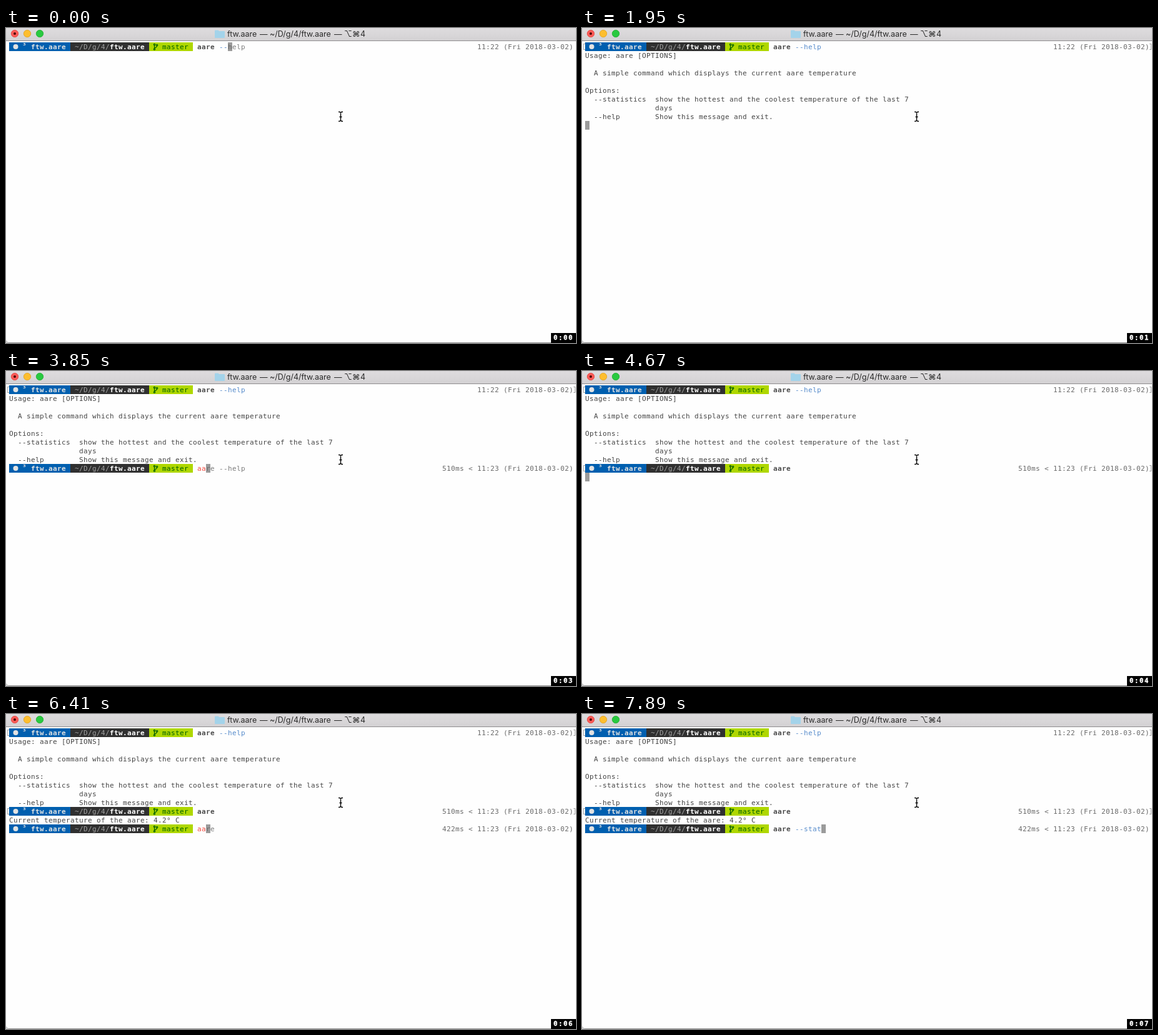
Recreate the animation shown at these times as an HTML page. Size 912 px wide and 505 px high, loop 8000 ms.

```html
<!DOCTYPE html>
<html lang="en">
<head>
<meta charset="utf-8">
<title>Terminal session</title>
<style>
  html, body { margin: 0; width: 100%; height: 100%; overflow: hidden; }
  #stage { position: relative; width: 912px; height: 505px; overflow: hidden; background: #d9d9d9; }
  #window {
    position: absolute; inset: 0; box-sizing: border-box; background: #fefefe;
    border-bottom: 1px solid #8c8c8c; border-bottom-left-radius: 5px;
  }
  svg { position: absolute; left: 0; top: 0; }
  .title { font: 12.5px Inter, "DejaVu Sans", sans-serif; fill: #2a2a2a; }
  #term {
    position: absolute; left: 0; top: 0; color: #444;
    font: 11px/14px "DejaVu Sans Mono", monospace;
    letter-spacing: calc(7px - 1ch);
  }
  #term div { position: absolute; box-sizing: border-box; height: 14px; padding-top: 1px; white-space: pre; }
  #term .blue { background: #005faf; color: #e2e2e2; font-weight: bold; }
  #term .blue span { position: relative; top: -2px; }
  #term .dark { background: #303030; color: #a0a0a0; }
  #term .dark b { color: #fff; }
  #term .green { background: #afd700; color: #005f00; }
  #term .time { color: #686868; }
  #term .cmd { color: #4a4a4a; font-weight: bold; }
  #term .bad { color: #f0483e; }
  #term .opt { color: #568bcb; }
  #term .hint { color: #7c7c7c; }
  #term .cursor { width: 7px; background: #9b9b9b; color: #666; }
  #term .mark { width: 3px; height: 10px; margin-top: 2px; border: 1px solid #a5a5a5; }
  #term .open { border-right: 0; }
  #term .close { border-left: 0; }
  #clock {
    position: absolute; left: 872px; top: 489px; width: 40px; height: 16px;
    box-sizing: border-box; padding-left: 4px; background: #000; color: #fff;
    font: bold 10.5px/14px "DejaVu Sans Mono", monospace;
    letter-spacing: calc(8px - 1ch); white-space: pre;
    -webkit-text-stroke: .4px #fff;
  }
</style>
</head>
<body>
<div id="stage">
  <div id="window"></div>
  <svg width="912" height="21">
    <defs>
      <linearGradient id="bar" x2="0" y2="1">
        <stop stop-color="#dedcde"/><stop offset="1" stop-color="#d3d1d3"/>
      </linearGradient>
    </defs>
    <rect width="912" height="20" fill="url(#bar)"/>
    <rect y="20" width="912" height="1" fill="#8e8c8e"/>
    <circle cx="14" cy="9" r="5.700" fill="#fc5b57" stroke="#e2443f" stroke-width=".8"/>
    <circle cx="14" cy="9" r="2" fill="#4a0505"/>
    <circle cx="34" cy="9" r="5.700" fill="#fdbe2f" stroke="#e0a020" stroke-width=".8"/>
    <circle cx="54" cy="9" r="5.700" fill="#29c940" stroke="#1dac2c" stroke-width=".8"/>
    <path d="M334 4.500q0-1 1-1h4.500l1.500 1.500h8q1 0 1 1V15q0 1-1 1h-14q-1 0-1-1z" fill="#a3d3ea"/>
    <text class="title" y="14"><tspan x="354">ftw.aare</tspan><tspan x="406">—</tspan><tspan x="422">~/D/g/4/ftw.aare</tspan><tspan x="525">—</tspan><tspan x="541">⌥</tspan><tspan x="554">⌘</tspan><tspan x="567">4</tspan></text>
  </svg>
  <div id="term"></div>
  <svg width="912" height="505" fill="none">
    <path d="M532 134.500h2l1.500 1.500 1.500-1.500h2M535.500 135.500v13.500M532 149.500h2l1.500-1.500 1.500 1.500h2M533.500 142.500h4" stroke="#000" stroke-width="1.400"/>
  </svg>
  <div id="clock"></div>
</div>
<script>
const LOOP = 8000, INPUT = 43;
const TICKS = [960, 2050, 3070, 4090, 5090, 6170, 7140];

const outputs = [
  { at: 1950, row: 1, lines: [
    'Usage: aare [OPTIONS]',
    '',
    '  A simple command which displays the current aare temperature',
    '',
    'Options:',
    '  --statistics  show the hottest and the coolest temperature of the last 7',
    '                days',
    '  --help        Show this message and exit.'] },
  { at: 5150, row: 10, lines: ['Current temperature of the aare: 4.2° C'] }
];

const prompts = [
  { row: 0, at: 0, enter: 1440, time: '11:22 (Fri 2018-03-02)',
    text: 'aare --help', keys: [0, 0, 0, 0, 0, 0, 0, 450, 660, 740, 870],
    history: ['aare --help'] },
  { row: 9, at: 2260, enter: 4670, time: '510ms < 11:23 (Fri 2018-03-02)',
    text: 'aare', keys: [3670, 3850, 4150, 4250],
    history: ['aare --help'] },
  { row: 11, at: 5330, enter: Infinity, time: '422ms < 11:23 (Fri 2018-03-02)',
    text: 'aare --stat', keys: [6230, 6410, 6710, 6760, 7000, 7230, 7360, 7540, 7720, 7800, 7890],
    history: ['aare', 'aare --help'] }
];

const passed = (times, t) => times.filter(at => at <= t).length;
const box = (x, row, cls, html = '') =>
  `<div class="${cls}" style="left:${x}px;top:${23 + 14 * row}px">${html}</div>`;
const cell = (col, row, cls, html) => box(5 + 7 * col, row, cls, html);
const escape = s => s.replace(/</g, '&lt;');

const dot = '<svg width="21" height="14"><circle cx="10.500" cy="7" r="4" fill="#e2e2e2"/></svg>';
const branch = `<svg width="17" height="14" fill="none" stroke="#005f00" stroke-width="1.200">
  <circle cx="8.500" cy="3.500" r="1.200"/><circle cx="8.500" cy="11" r="1.200"/><circle cx="12.500" cy="4.500" r="1.200"/>
  <path d="M8.500 4.500V10M12.500 5.500q0 2.500-4 3.500"/></svg>`;

function drawPrompt(p, t) {
  const typed = p.text.slice(0, passed(p.keys, t));
  const [cmd] = typed.split(' ');
  const done = t >= p.enter;
  const match = typed && !done && p.history.find(h => h.startsWith(typed));
  const hint = match ? match.slice(typed.length) : '';
  const end = INPUT + typed.length;
  const html = cell(0, p.row, 'blue', dot + '   <span>³</span> ftw.aare ')
    + cell(14, p.row, 'dark', ' ~/D/g/4/<b>ftw.aare</b> ')
    + cell(32, p.row, 'green', branch + '   master ')
    + cell(129 - p.time.length, p.row, 'time', escape(p.time))
    + cell(INPUT, p.row, cmd === 'aare' ? 'cmd' : 'bad', cmd)
    + cell(INPUT + cmd.length, p.row, 'opt', typed.slice(cmd.length));
  if (done) return html + box(2, p.row, 'mark open') + box(908, p.row, 'mark close');
  return html + cell(end, p.row, 'cursor', hint[0]) + cell(end + 1, p.row, 'hint', hint.slice(1));
}

function drawScreen(t) {
  const shown = prompts.filter(p => t >= p.at);
  const printed = outputs.filter(o => t >= o.at);
  let html = '';
  for (const o of printed) o.lines.forEach((line, i) => html += cell(0, o.row + i, '', line));
  for (const p of shown) html += drawPrompt(p, t);
  const last = shown[shown.length - 1];
  if (t >= last.enter) {
    const out = printed[shown.length - 1];
    html += cell(0, out ? out.row + out.lines.length : last.row + 1, 'cursor');
  }
  return html;
}

const term = document.getElementById('term');
const clock = document.getElementById('clock');
let current = '';

function frame() {
  const t = performance.now() % LOOP;
  const html = drawScreen(t);
  if (html !== current) term.innerHTML = current = html;
  const label = '0:0' + passed(TICKS, t);
  if (clock.textContent !== label) clock.textContent = label;
  requestAnimationFrame(frame);
}
frame();
</script>
</body>
</html>
```
